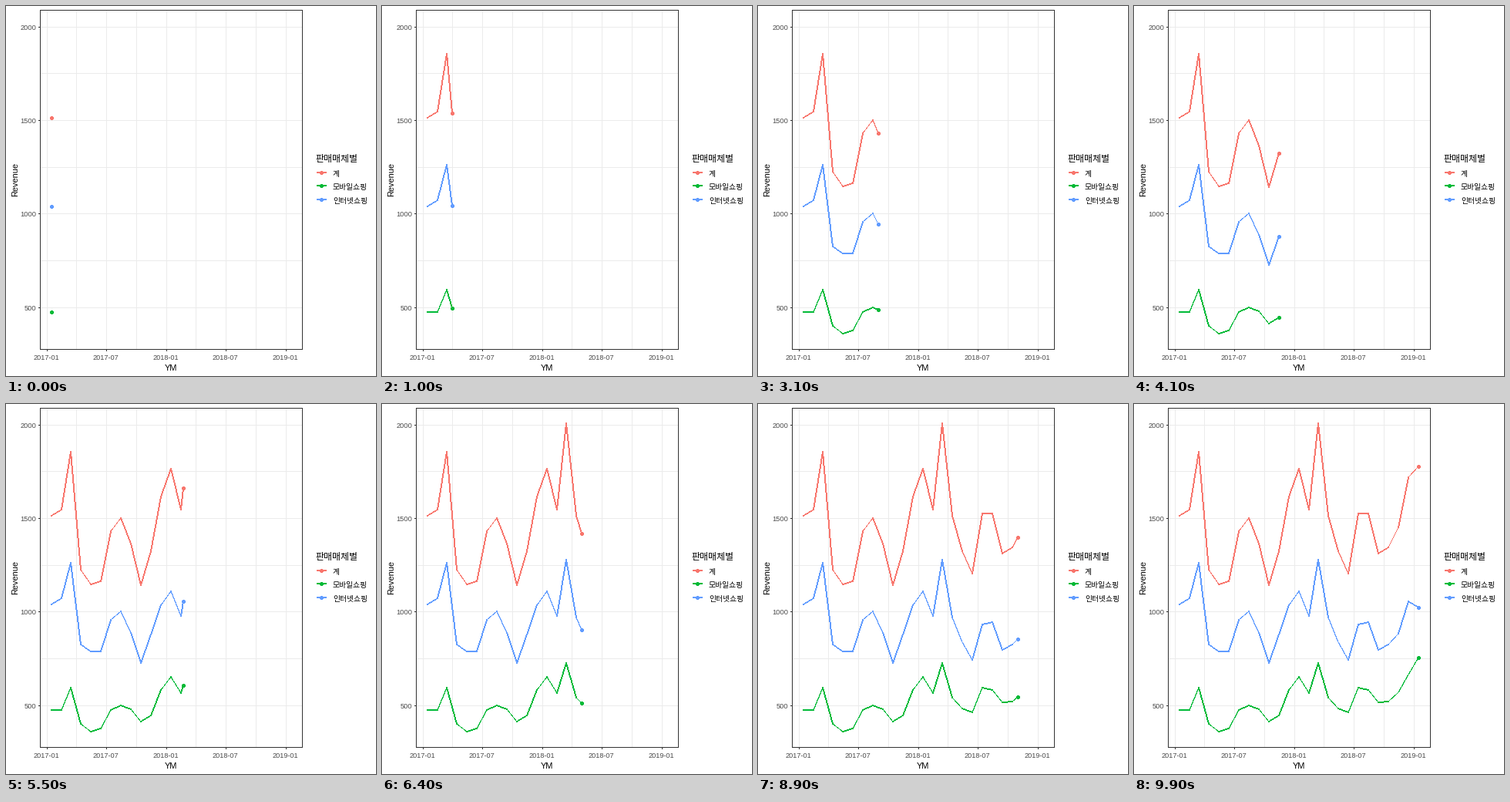
Animation of 480 by 480 pixels, one loop 10 s. Source, as a matplotlib script:

```python
import numpy as np
import matplotlib.pyplot as plt
from matplotlib.animation import FuncAnimation
from matplotlib.patches import PathPatch, Rectangle
from matplotlib.path import Path

SIZE, DPI, FRAMES = 480, 100, 100
LEFT, RIGHT, TOP, BOTTOM = 44, 384, 5, 445
DARK, GRID, TICK_TEXT = "#333333", "#EBEBEB", "#4D4D4D"
KOREAN = "Noto Sans CJK JP"
START = np.datetime64("2017-01-15")

mobile = np.array([476, 476, 592, 400, 359, 377, 476, 499, 478, 414, 445, 581, 652,
                   565, 727, 542, 484, 462, 594, 581, 517, 518, 570, 664, 755])
web = np.array([1037, 1070, 1263, 824, 789, 787, 956, 1002, 886, 726, 880, 1035, 1111,
                979, 1280, 969, 839, 742, 932, 944, 796, 824, 882, 1055, 1022])
SERIES = [("계", "#F8766D", mobile + web),
          ("모바일쇼핑", "#00BA38", mobile),
          ("인터넷쇼핑", "#619CFF", web)]

months = np.arange("2017-01", "2019-02", dtype="datetime64[M]")
days = months.astype("datetime64[D]").astype(int)
days = days - days[0]
reveal = np.round(days / days[-1] * (FRAMES - 1)).astype(int)


def x_of(day):
    return 59.5 + 310 * np.asarray(day) / 730


def y_of(value):
    return 391.3 - (np.asarray(value) - 500) * 0.24267


def px(n):
    return n * 72 / DPI


fig = plt.figure(figsize=(SIZE / DPI, SIZE / DPI), dpi=DPI, facecolor="white")
ax = fig.add_axes([0, 0, 1, 1])
ax.set_xlim(0, SIZE)
ax.set_ylim(SIZE, 0)
ax.axis("off")

# Crisp drawing: shapes are built from whole pixels
SQUARE = np.array([[0, 0], [1, 0], [1, 1], [0, 1]])
DISC = np.array([(i, j) for i in range(-2, 3) for j in range(-2, 3)
                 if i * i + j * j < 8])


def pixel_path(cells):
    return Path.make_compound_path_from_polys(cells[:, None, :] + SQUARE)


def pixel_patch(cells, color):
    patch = PathPatch(pixel_path(cells), fc=color, ec="none", lw=0,
                      antialiased=False, zorder=4)
    return ax.add_patch(patch)


def stroke(p, q):
    """Pixels of a two-pixel pen, which thins out on diagonals."""
    dx, dy = np.abs(q - p)
    along = int(dy > dx)
    across = 1 - along
    half = 0.2 if 35 < np.degrees(np.arctan2(dy, dx)) < 68 else 0.5
    lo, hi = sorted((p[along], q[along]))
    t = np.arange(lo - 1, hi + 1)
    slope = (q[across] - p[across]) / (q[along] - p[along])
    c = p[across] + (t + 0.5 - p[along]) * slope
    cells = []
    for side in (-half, half):
        pair = [t, np.floor(c + side)]
        cells.append(np.column_stack(pair[::-1] if along else pair))
    return np.vstack(cells)


def rule(x0, y0, x1, y1, color, width=1):
    ax.plot([x0, x1], [y0, y1], color=color, lw=px(width), antialiased=False,
            solid_capstyle="butt", zorder=1)


def label(x, y, s, size, color="black", font="Liberation Sans", ha="left", **kw):
    ax.text(x, y, s, fontsize=px(size), color=color, family=font, ha=ha,
            va="baseline", **kw)


# Grid, ticks and tick labels
breaks = np.array(["2017-01", "2017-07", "2018-01", "2018-07", "2019-01"],
                  dtype="datetime64[M]")
xt = x_of((breaks.astype("datetime64[D]") - START).astype(int))
for x in np.floor(np.concatenate([xt, (xt[1:] + xt[:-1]) / 2])):
    rule(x, TOP, x, BOTTOM, GRID)
for v in range(500, 2001, 250):
    y = np.floor(y_of(v))
    rule(LEFT, y, RIGHT, y, GRID)
    if v % 500 == 0:
        rule(42, y, 44, y, DARK)
        label(39, y + 4, str(v), 9.3, TICK_TEXT, ha="right")
for x, b in zip(np.floor(xt), breaks):
    rule(x, 446, x, 447, DARK)
    label(x - 0.3, 459, str(b), 9.2, TICK_TEXT, ha="center")

ax.add_patch(Rectangle((LEFT, TOP), RIGHT - LEFT, BOTTOM - TOP, fill=False,
                       ec=DARK, lw=px(1), antialiased=False, zorder=5))
label(213.7, 473, "YM", 11, ha="center")
label(15, 225, "Revenue", 11, ha="center", rotation=90, rotation_mode="anchor")

# Legend
label(401, 202, "판매매체별", 11.9, font=KOREAN)
for i, (name, color, _) in enumerate(SERIES):
    y = np.floor(216.5 + 17.3 * i)
    rule(403, y, 416, y, color, 2)
    pixel_patch(DISC + [409, y], color)
    label(424, y + 4.6, name, 9.8, font=KOREAN)

# Moving parts
xs = x_of(days)
traces = [pixel_patch(DISC, color) for _, color, _ in SERIES]


def draw(frame):
    seen = reveal <= frame
    for (_, _, values), trace in zip(SERIES, traces):
        ys = y_of(values)
        head = np.array([np.interp(frame, reveal, xs), np.interp(frame, reveal, ys)])
        pts = np.floor(np.vstack([np.column_stack([xs, ys])[seen], head]))
        cells = [stroke(p, q) for p, q in zip(pts, pts[1:]) if np.any(p != q)]
        trace.set_path(pixel_path(np.vstack(cells + [DISC + pts[-1]])))
    return traces


anim = FuncAnimation(fig, draw, frames=FRAMES, interval=100, repeat=True,
                     repeat_delay=0, blit=False)
plt.show()
```
